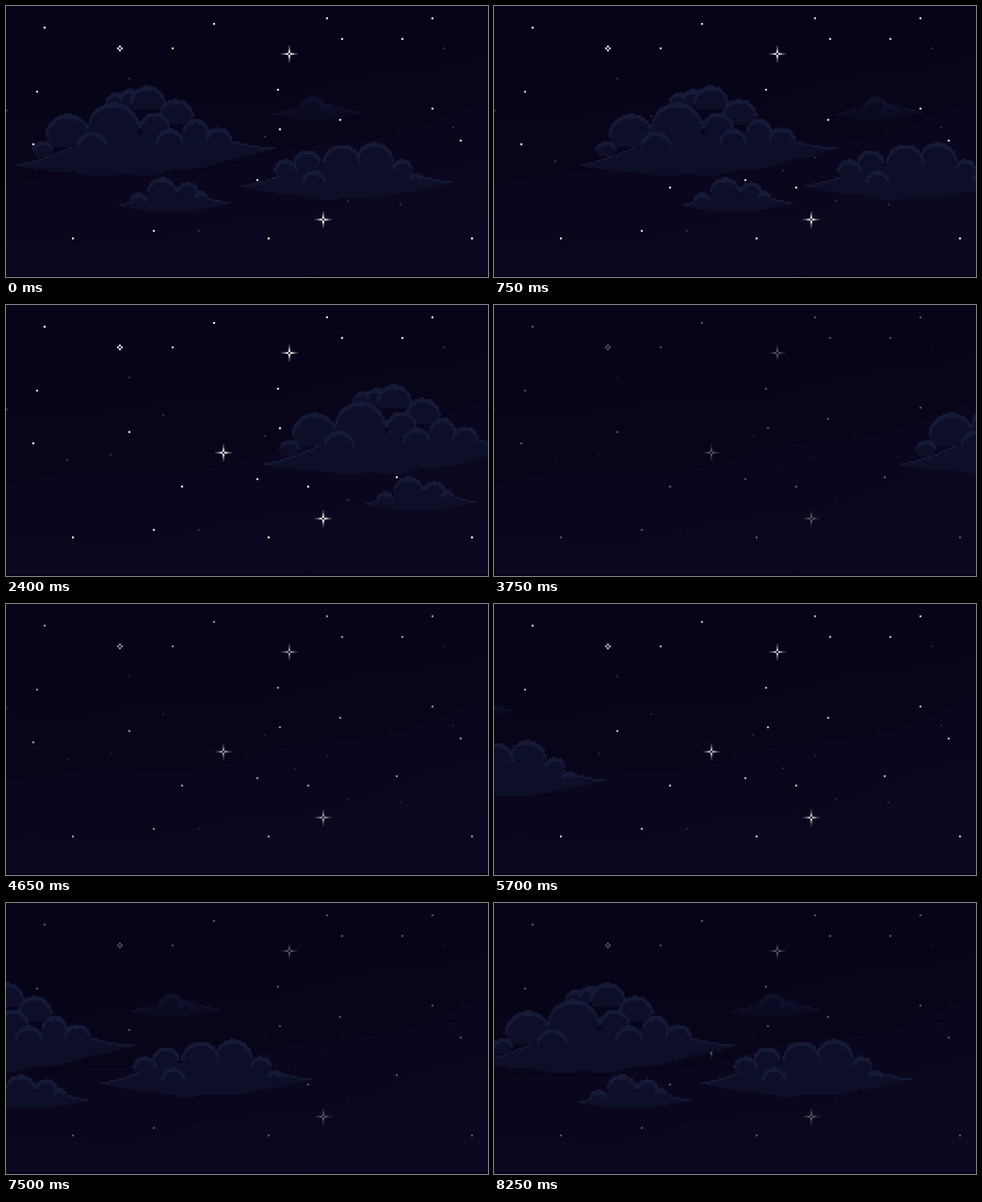
Animation of 680 by 383 pixels, one loop 8400 ms. Source, as an HTML page with a canvas:

```html
<!DOCTYPE html>
<html lang="en">
<head>
<meta charset="utf-8">
<title>Night sky</title>
<style>
  html, body { margin: 0; width: 100%; height: 100%; overflow: hidden; background: #060419; }
  canvas { display: block; width: 100vw; height: 100vh; }
</style>
</head>
<body>
<canvas id="sky" width="768" height="432"></canvas>
<script>
const W = 256, H = 144, ZOOM = 3, CELL = 2.657;
const LOOP = 8400, STEP = 150, SPAN = 512;
const RIM = '#141a37', BODY = '#0d0e28';

// Cloud drift: time and distance in cells, linear in between.
const DRIFT = [[0, 0], [1650, 87], [3750, 210], [5700, 334], [7500, 437], [8250, 497], [LOOP, SPAN]];

const STARS = '20,11 110,9 170,6 226,6 88,22 178,17 210,17 16,45 144,44 226,54 177,60 65,67 ' +
  '145,65 14,73 241,71 133,92 93,96 160,96 207,91 35,123 78,119 139,123 247,123';
const CROSSES = '150,25 115,78 168,113';

// Clouds in stage pixels: both tips, depth of the belly, puffs (x, y, radius) from back to front.
const CLOUDS = [
  { tips: '16,225 378,201', depth: 25,
    puffs: '155,136,15 176,132,16 200,136,25 240,155,25 268,176,18 300,189,19 ' +
      '88,184,33 152,172,37 210,171,22 231,192,20 122,198,22 52,204,15' },
  { tips: '333,254 628,249', depth: 21,
    puffs: '520,218,27 559,230,15 474,221,27 425,222,20 395,232,17 435,248,17 578,245,10' },
  { tips: '159,281 315,278', depth: 10,
    puffs: '256,263,16 220,263,22 275,270,10 187,274,12' },
  { tips: '378,153 497,150', depth: 8, alpha: 0.65,
    puffs: '433,146,19 452,149,12' }
];

const points = s => s.split(' ').map(p => p.split(',').map(Number));

function layer(draw) {
  const c = document.createElement('canvas');
  c.width = W;
  c.height = H;
  draw(c.getContext('2d'));
  return c;
}

function rng(seed) {
  return () => (seed = seed * 16807 % 2147483647) / 2147483647;
}

const backdrop = layer(g => {
  g.fillStyle = '#060419';
  g.fillRect(0, 0, W, H);
  for (let i = 0; i < 4; i++) {
    g.fillStyle = `rgb(${8 + i * 1.6}, ${4.5 + i * 1.3}, ${27 + i * 2})`;
    for (let x = 0; x < W; x++) {
      const u = x / W;
      const top = Math.round(57 + 35 * i - (34 + 6 * i) * u * u + 2.5 * Math.sin(x / 17 + i * 2));
      g.fillRect(x, top, 1, Math.max(0, H - top));
    }
  }
  g.fillStyle = '#05031a';
  g.fillRect(0, H - 1, W, 1);
});

const starfield = layer(g => {
  const dot = (x, y, color) => {
    g.fillStyle = color;
    g.fillRect(x, y, 1, 1);
  };
  const ring = (x, y, d, color) => {
    dot(x - d, y, color);
    dot(x + d, y, color);
    dot(x, y - d, color);
    dot(x, y + d, color);
  };
  const rand = rng(71);
  for (let i = 0; i < 13; i++) {
    dot(Math.floor((i + rand()) * W / 13), Math.floor(15 + rand() * 119), '#32313f');
  }
  for (const [x, y] of points(STARS)) dot(x, y, '#f4f3ee');
  ring(60, 22, 1, '#f4f3ee');
  for (const [x, y] of points(CROSSES)) {
    ['#fbfaf4', '#a5a39f', '#55535a', '#36343f'].forEach((c, i) => ring(x, y, i + 1, c));
  }
});

function disc(g, cx, cy, r, color, floor) {
  g.fillStyle = color;
  for (let y = Math.ceil(cy - r); y <= floor; y++) {
    const half = Math.sqrt(Math.max(0, r * r - (y - cy) ** 2));
    const left = Math.round(cx - half);
    g.fillRect(left, y, Math.round(cx + half) - left, 1);
  }
}

// Tapered body between the tips: swept-up shoulders above, a scalloped belly below.
function hull(g, [[x0, y0], [x1, y1]], depth) {
  const width = x1 - x0;
  for (let x = Math.round(x0); x < x1; x++) {
    const u = (x + 0.5 - x0) / width;
    const edge = Math.max(0, Math.min(u, 1 - u));
    const axis = y0 + (y1 - y0) * u;
    const top = Math.round(axis - 0.58 * width * Math.min(edge, 0.28) ** 1.5 - 0.5);
    const lobes = 0.8 + 0.2 * Math.abs(Math.sin(u * width / 9));
    const bottom = Math.round(axis + depth * Math.sin(Math.PI * edge) * lobes + 0.5);
    g.fillStyle = BODY;
    g.fillRect(x, top, 1, Math.max(1, bottom - top));
    if (edge < 0.22) {
      g.fillStyle = RIM;
      g.fillRect(x, top, 1, 1);
    }
  }
}

const clouds = layer(g => {
  const toCells = s => points(s).map(p => p.map(v => v / CELL));
  for (const { tips, depth, puffs, alpha = 1 } of CLOUDS) {
    const shape = layer(s => {
      hull(s, toCells(tips), depth / CELL);
      for (const [x, y, r] of toCells(puffs)) {
        disc(s, x, y, r, RIM, y);
        disc(s, x, y + 1.4, r - 1, BODY, y + r * 0.4);
      }
    });
    g.globalAlpha = alpha;
    g.drawImage(shape, 0, 0);
  }
});

function drift(t) {
  const i = DRIFT.findIndex(([time]) => time > t);
  const [t0, x0] = DRIFT[i - 1], [t1, x1] = DRIFT[i];
  return Math.round(x0 + (x1 - x0) * (t - t0) / (t1 - t0));
}

function twinkle(t) {
  const phase = t / 800 % 1;
  const away = Math.min(phase, 1 - phase);
  return Math.min(1, Math.max(0.35, 1.1 - 2.5 * away));
}

const ctx = document.getElementById('sky').getContext('2d');
ctx.imageSmoothingEnabled = false;
ctx.scale(ZOOM, ZOOM);

function frame() {
  const t = Math.floor(performance.now() % LOOP / STEP) * STEP;
  const x = drift(t);
  ctx.globalAlpha = 1;
  ctx.drawImage(backdrop, 0, 0);
  ctx.globalAlpha = twinkle(t);
  ctx.drawImage(starfield, 0, 0);
  ctx.globalAlpha = 1;
  ctx.drawImage(clouds, x, 0);
  ctx.drawImage(clouds, x - SPAN, 0);
  requestAnimationFrame(frame);
}
frame();
</script>
</body>
</html>
```
